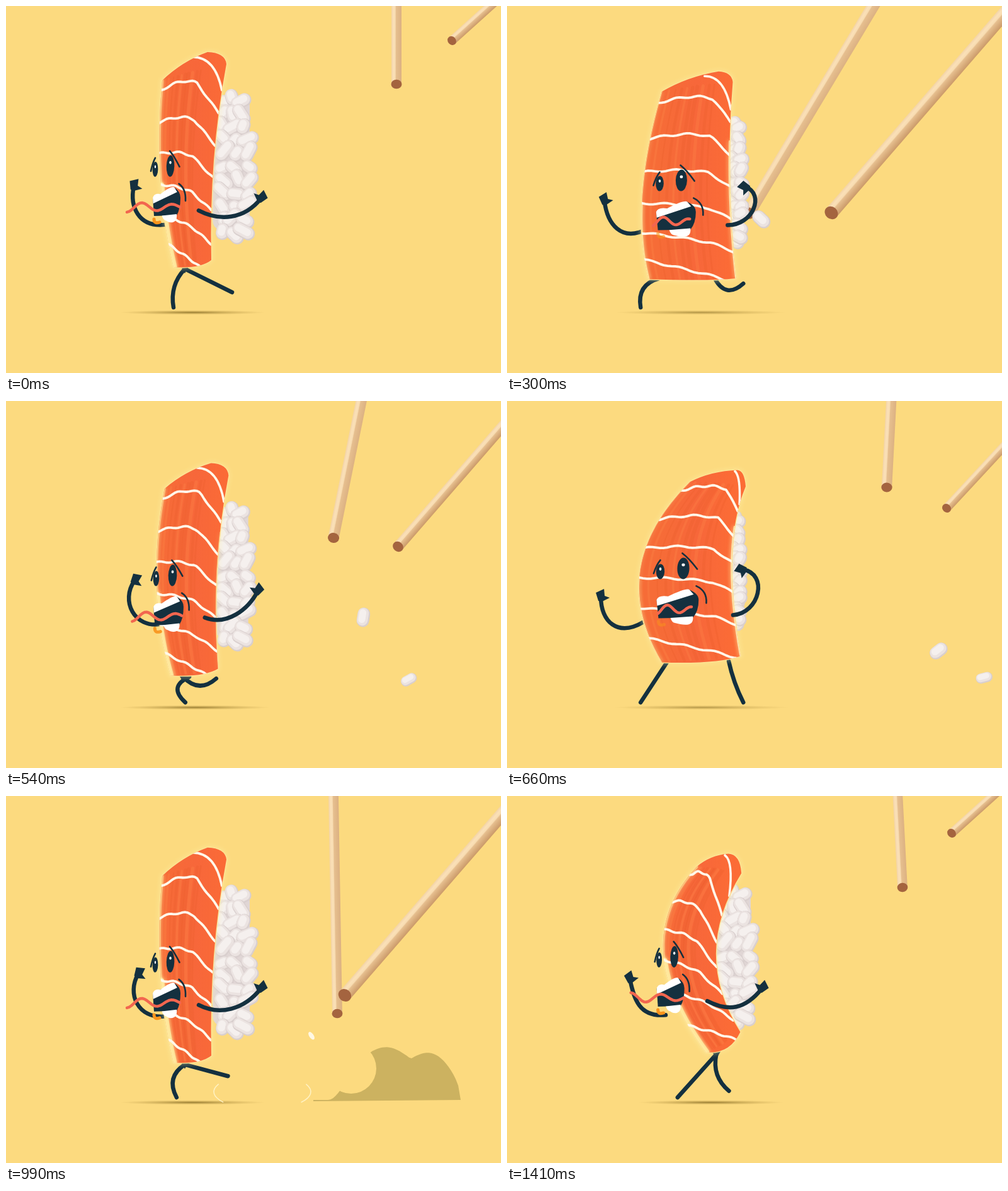
Write an HTML page with a canvas that moves like this. It is 786 px wide and 582 px high and loops after 1440 ms.

```html
<!DOCTYPE html>
<html lang="en">
<head>
<meta charset="utf-8">
<title>Sushi run</title>
<style>
html, body { margin: 0; width: 100%; height: 100%; overflow: hidden; background: #fcda7f; }
canvas { display: block; }
</style>
</head>
<body>
<canvas id="stage" width="786" height="582"></canvas>
<script>
const g = document.getElementById('stage').getContext('2d');
const LOOP = 1440, FRAME = 30, RUN = 480, STRIDE = RUN / 2;
const GROUND = 484, INK = '#14303f', CREAM = '#fff8ea', TAU = Math.PI * 2;

const mix = (a, b, k) => a + (b - a) * k;
const blend = (p, q, k) => p.map((v, i) => mix(v, q[i], k));
const clamp = (v, lo = 0, hi = 1) => Math.max(lo, Math.min(hi, v));
const ease = k => { k = clamp(k); return k * k * (3 - 2 * k); };
const wave = (t, peak, period) => Math.cos(TAU * (t - peak) / period);
const noise = k => { const v = Math.sin(k * 127.1 + 3.7) * 43758.5453; return v - Math.floor(v); };
const add = (p, x, y) => [p[0] + x, p[1] + y];

// ---- drawing helpers ----
function fill(color, draw) {
  g.beginPath(); draw(); g.fillStyle = color; g.fill();
}
function line(color, width, draw) {
  g.beginPath(); draw(); g.strokeStyle = color; g.lineWidth = width; g.stroke();
}
function poly(points) {
  points.forEach(p => g.lineTo(...p));
}
// Samples f(0..1) into a polyline.
function plot(f, n = 24) {
  for (let i = 0; i <= n; i++) g.lineTo(...f(i / n));
}
function local(x, y, turn, draw) {
  g.save(); g.translate(x, y); g.rotate(turn); draw(); g.restore();
}
function ramp(x0, x1, ...stops) {
  const s = g.createLinearGradient(x0, 0, x1, 0);
  stops.forEach(([at, color]) => s.addColorStop(at, color));
  return s;
}
const quad = (a, b, c, k) => blend(blend(a, b, k), blend(b, c, k), k);

// ---- what drives the run ----
// turn: 0 side view, 1 front view. bend: 0 upright, 1 arched. lift: bounce.
function mood(t) {
  const p = (t % STRIDE) / STRIDE;
  return {
    t,
    turn: clamp(.5 + .6 * wave(t, 225, RUN)),
    bend: ease((p - .15) / .55) * (1 - ease((p - .85) / .15)),
    lift: -18 * wave(t, 228, STRIDE),
    flick: Math.max(0, 1 - Math.abs(t % RUN - 450) / 30)
  };
}

// Outline keys: left top, bow, bottom; right top, bow, bottom; peak.
const SHAPES = [
  [[248,135], [233,291], [266,431], [350,109], [322,257], [326,420], [320,90]],
  [[305,128], [184,247], [320,422], [374,141], [290,268], [374,388], [354,109]],
  [[240,129], [190,318], [213,428], [358,113], [352,278], [370,430], [336,98]],
  [[290,134], [155,269], [245,420], [379,141], [339,236], [371,410], [366,115]]
];
function slab({ turn, bend, lift }) {
  return SHAPES[0].map((_, i) => {
    const [side, arched, front, frontArched] = SHAPES.map(s => s[i]);
    return add(blend(blend(side, arched, bend), blend(front, frontArched, bend), turn), 0, lift);
  });
}

// ---- character ----
function shadow({ turn, bend }) {
  const dark = mix(.7, .5, turn);
  g.save();
  g.translate(mix(296 + 30 * bend, 309, turn), 486);
  g.scale(mix(116, 140, turn), 3.6);
  const s = g.createRadialGradient(0, 0, 0, 0, 0, 1);
  s.addColorStop(0, `rgba(105,80,15,${dark})`);
  s.addColorStop(.4, `rgba(125,97,25,${dark * .55})`);
  s.addColorStop(1, 'rgba(160,125,45,0)');
  fill(s, () => g.arc(0, 0, 1, 0, TAU));
  g.restore();
}

function grain(x, y, turn, len, w) {
  const dx = Math.cos(turn) * len / 2, dy = Math.sin(turn) * len / 2;
  [['#d9cfce', 1], ['#ebe3e1', .87], ['#f5f0ee', .55]].forEach(([color, k], o) =>
    line(color, w * k, () => {
      g.moveTo(x - dx - o * .8, y - dy - o);
      g.lineTo(x + dx - o * .8, y + dy - o);
    }));
}

function rice({ turn, bend, lift }) {
  const x = mix(334, 350, turn), w = mix(61, 31, turn);
  const y = 154 + lift + 6 * bend + 23 * turn, h = 235 - 14 * bend - 38 * turn;
  fill('#e0d6d5', () => g.roundRect(x - 6, y + 6, w - 2, h - 22, 16));
  for (let i = 0; i < 33; i++) {
    const v = Math.floor(i / 3) / 10, u = clamp((i % 3) / 2 + (noise(i) - .5) * .2);
    const reach = (w - 22) * (.75 + .35 * Math.sin(Math.PI * v * .9));
    grain(x + 10 + reach * u, y + 12 + (h - 24) * v + (noise(i + 90) - .5) * 8,
      noise(i + 50) * 3, mix(6 + 12 * noise(i + 20), 5, turn), 21);
  }
}

function arm(shoulder, c1, c2, hand, side) {
  line(INK, 6.5, () => { g.moveTo(...shoulder); g.bezierCurveTo(...c1, ...c2, ...hand); });
  local(...hand, Math.atan2(hand[1] - c2[1], hand[0] - c2[0]) + Math.PI / 2, () => {
    g.scale(side, 1);
    fill(INK, () => poly([[-4, 6], [-8, -7], [5, -13], [6, -2], [14, 1], [2, 7]]));
  });
}
function farArm({ t, turn, lift }) {
  const swing = wave(t, 105, RUN) * (1 - turn);
  const shoulder = [mix(252, 217, turn), 352 + lift * .3];
  const hand = [mix(199, 149, turn) + 20 * swing, mix(288, 311, turn) - 11 * swing];
  arm(shoulder, add(shoulder, -42, mix(4, 25, turn)), add(hand, -34 * swing, mix(32, 38, turn)), hand, 1);
}
function nearArm({ turn, bend, lift }) {
  const shoulder = [mix(306 + 13 * bend, 359, turn), 338 + lift * .8 + turn * 6];
  const hand = [mix(405, 374, turn), mix(305, 285 - 18 * bend, turn)];
  arm(shoulder, add(shoulder, mix(33, 42, turn), mix(17, -3, turn)),
    add(hand, mix(-27, 42, turn), mix(34, 7, turn)), hand, -1);
}

// Each foot slides back on the ground, then lifts and swings forward.
function leg(t, hip, center, reach) {
  t %= RUN;
  const air = Math.sin(Math.PI * clamp((t - 190) / 230));
  const foot = [center - reach * wave(t, 0, RUN), 478 - 38 * air];
  const dx = foot[0] - hip[0], dy = foot[1] - hip[1], d = Math.hypot(dx, dy);
  const slack = .55 * Math.sqrt(Math.max(0, 70 * 70 - d * d)) / d;
  const knee = add(blend(hip, foot, .5), -dy * slack, dx * slack);
  line(INK, 6.5, () => { g.moveTo(...hip); g.quadraticCurveTo(...knee, ...foot); });
}
function legs({ t, turn }, shape) {
  const [, , left, , , right] = shape;
  const hip = k => [mix(left[0], right[0], mix(.3, k, turn)), left[1] + mix(3, -2, turn)];
  leg(t + STRIDE, hip(.08), 273, 86);
  leg(t, hip(.85), 330, 64);
  if (turn < .2) {
    const [x, y] = hip(0);
    fill(INK, () => poly([[x - 7, y - 5], [x + 7, y - 5], [x, y + 7]]));
  }
}

function fillet({ turn, bend }, shape) {
  const [tl, lc, bl, tr, rc, br, top] = shape;
  const L = v => quad(tl, lc, bl, v), R = v => quad(tr, rc, br, v);
  const outline = () => {
    g.moveTo(...bl);
    g.quadraticCurveTo(...lc, ...tl);
    g.quadraticCurveTo(...add(blend(tl, top, .5), -4, -8), ...top);
    g.quadraticCurveTo(tr[0] - 2, top[1] + 1, ...tr);
    g.quadraticCurveTo(...rc, ...br);
    g.quadraticCurveTo(mix(bl[0], br[0], .7), Math.max(bl[1], br[1]) + 3, ...bl);
    g.closePath();
  };
  g.save();
  g.shadowColor = '#fff0a8';
  g.shadowBlur = 7;
  line('#fde596', 2.5, outline);
  g.restore();

  g.save();
  fill(ramp(240, 365, [0, '#f66c37'], [.5, '#f7673a'], [1, '#fc6c35']), outline);
  g.clip();
  const peak = mix(.62, .79, turn);
  for (let i = 0; i < 9; i++) {
    const u = .1 + (peak - .12) * i / 8 + noise(i) * .03;
    line(i % 3 ? 'rgba(214,76,30,.13)' : 'rgba(255,150,80,.2)', 2 + 4 * noise(i + 7),
      () => plot(v => blend(L(v), R(v), u)));
  }
  g.shadowColor = '#fff0a0';
  g.shadowBlur = 6;
  line('rgba(255,225,145,.6)', mix(5, 1.5, turn), () => plot(L));
  line('rgba(255,236,160,.85)', mix(11, 2, turn), () => plot(k => L(mix(.55, 1, k))));
  line('#fdeab4', 3 * turn + .01, () => plot(k => R(mix(.3, 1, k))));
  g.shadowBlur = 0;

  line(CREAM, 3.6, () => {
    g.moveTo(...add(top, mix(-24, -4, bend), mix(8, 2, bend)));
    g.quadraticCurveTo(...blend(top, tr, .4), ...R(.14));
  });
  for (let i = 0; i < 6; i++) {
    const v = .05 + .165 * i, a = L(v), b = R(v + mix(.21, .14, turn));
    const bow = mix(34, 28, turn) * (1 - i / 6) ** 1.4;
    line(CREAM, 3.8, () => plot(u => {
      const rise = u < peak ? Math.sin(u / peak * Math.PI / 2) : (1 - u) / (1 - peak);
      return add(blend(a, b, u), 0, Math.sin(u * 19 + i * 2) * 1.5 - bow * rise);
    }));
  }
  g.restore();
}

function drawFace({ turn, bend, lift, flick }) {
  const wide = mix(1, 1.52, turn);
  const x0 = mix(261 + 5 * bend, 280, turn), y0 = 271 + lift;
  const at = (x, y) => [x0 + x * wide, y0 + y];
  const eye = (x, y, rx, ry) => {
    const [cx, cy] = at(x, y);
    fill(INK, () => g.ellipse(cx, cy, rx * wide, ry, .03, 0, TAU));
    fill('#fff', () => g.ellipse(cx, cy - ry * .33, rx * wide * .27, 2.4, 0, 0, TAU));
  };
  const stroke = (a, b, c) =>
    line(INK, 2.6, () => { g.moveTo(...a); g.quadraticCurveTo(...b, ...c); });
  eye(-24, 5, 4.4, 12);
  eye(0, 0, 6.3, 17);
  stroke(at(-24, -13), at(-28, -6), at(-31, 8));
  stroke(at(-1, -24), at(6, -16), at(14.5, 1));
  stroke(at(13.5, 28), at(25, 36), at(24, 55));

  const a = at(-28, 50), b = at(6.5, 34), c = at(16, 50), d = at(10, 78), e = at(-26, 79);
  line(`rgba(248,148,28,${mix(1, .5, turn)})`, 5, () => {
    g.moveTo(...add(e, 0, 5));
    g.quadraticCurveTo(...add(e, 0, 13), ...add(e, 9, 10));
  });
  fill(INK, () => {
    g.moveTo(...a); g.lineTo(...b);
    g.quadraticCurveTo(...add(c, 0, -10), ...c);
    g.quadraticCurveTo(...add(c, 0, 18), ...d);
    g.lineTo(...e);
  });
  fill('#fff', () => {
    g.moveTo(...a);
    g.quadraticCurveTo(...add(a, 3, -8), ...blend(a, b, .35));
    g.quadraticCurveTo(...add(b, -4, -4), ...b);
    g.lineTo(...blend(b, c, .45));
    g.lineTo(...blend(a, e, .32));
  });
  const gum = blend(e, d, .35);
  fill('#fff', () => {
    g.moveTo(...gum); g.lineTo(...add(d, 0, -2));
    g.bezierCurveTo(...add(d, 2, 14), ...add(d, -12, 13), ...add(gum, 7, 8));
    g.quadraticCurveTo(...add(gum, 2, 7), ...gum);
  });

  const phase = turn * Math.PI / 2 + flick * Math.PI, turns = mix(1.75, 1.4, turn);
  line('#f2664f', 4.5, () => plot(u => [
    x0 + mix(mix(15, 13, turn), mix(-69, -40, turn), u),
    y0 + 65 - (4 + 4 * u) * Math.sin(TAU * turns * u + phase)
  ]));
}

// ---- chopsticks ----
const HITS = [840, 1140], DOWN = [416, 473, 13, 430, 449];
// Time, then tip and lean of the left stick, tip of the right one.
const PATH = [
  [0, 620, 124, 0, 708, 55], [180, 331, 360, 42, 483, 364], [420, 437, 297, 20, 547, 292],
  [660, 603, 137, 3, 698, 170], [HITS[0], ...DOWN], [900, ...DOWN], [990, 526, 345, -1, 538, 316],
  [HITS[1], ...DOWN], [1230, ...DOWN], [1410, 628, 145, -3, 706, 59], [LOOP, 620, 124, 0, 708, 55]
];
function stick(x, y, lean, w, len, dark) {
  local(x, y, lean * Math.PI / 180, () => {
    fill(ramp(-w / 2, w / 2, [0, '#f3d3a5'], [.2, '#fae0b8'], [.38, '#f8dcb1'], [.46, '#e6bf8f'], [1, dark]),
      () => poly([[-w / 2, 0], [-w / 2, 4 - len], [0, -len], [w / 2, 10 - len], [w / 2, 0]]));
    fill('#a4643f', () => g.ellipse(0, 0, w / 2 + .5, w * .46, 0, 0, TAU));
  });
}
function chopsticks(t) {
  const i = PATH.findIndex(k => k[0] > t), from = PATH[i - 1], to = PATH[i];
  const k = ease((t - from[0]) / (to[0] - from[0]));
  const [, ax, ay, lean, bx, by] = blend(from, to, k);
  stick(ax, ay, lean, 16 + lean * .1, 477, '#dcb182');
  stick(bx, by, mix(48, 41, clamp(by / 150 - .4)), clamp(14 + (by - 170) * .045, 14, 23), 800, '#cb9a69');
}

// ---- dust, ring and loose grains ----
function puff(age) {
  const grow = 1 - (1 - clamp(age / 90)) ** 2, late = clamp((age - 90) / 60);
  const x = mix(440, 488, late), width = mix(245, 234, late) * grow;
  const height = mix(50, 84, late) * grow, rise = mix(.45, .3, late);
  const eaten = Math.max(0, age - 90);
  g.save();
  g.beginPath();
  g.rect(0, 0, 786, 582);
  g.arc(548 + Math.max(0, age - 150) * .7, 432, eaten < 60 ? eaten * .67 : 40 + (eaten - 60) * 1.3, 0, TAU);
  g.clip('evenodd');
  fill('#ccb260', () => {
    plot(u => {
      const dome = ease((u - .1) / rise) * Math.sqrt(1 - u ** 7);
      return [x + u * width, GROUND - 2 - height * dome * (.8 + .2 * Math.abs(Math.sin(u * 9.5)))];
    }, 60);
    g.lineTo(x, GROUND);
  });
  g.restore();
}
function impact(age) {
  if (age < 0 || age > 260) return;
  puff(age);
  const grow = 1 - (1 - clamp(age / 90)) ** 2, fade = 1 - clamp((age - 60) / 110);
  if (fade > 0)
    for (const mid of [Math.PI * .97, .1])
      line('#fff2c4', 1 + 3 * fade, () =>
        g.ellipse(407, 469, 77 * grow, 28 * grow, 0, mid - .35 - fade, mid + .35 + fade));
  if (age > 40 && age < 190)
    local(491 - (age - 90) * .1, 424 - (age - 90) * .73, .6 - (age - 90) * .02, () =>
      fill('#fff8e4', () => g.ellipse(0, 0, 3.5, 7, 0, 0, TAU)));
}

// Thrown rice falls, bounces once and flies out to the right.
function thrown(age, x, y, vy, w) {
  const pull = .0073, floor = 478, px = x + age * .983;
  if (age < 0 || px > 810) return;
  const land = (-vy + Math.sqrt(vy * vy + 2 * pull * (floor - y))) / pull, after = age - land;
  const py = after < 0 ? y + vy * age + pull * age * age / 2
    : floor - .86 * after + pull * after * after / 2;
  grain(px, py, 3.1 - 2.5 * Math.exp(-age / 150), 11, after < 0 ? w : w * .75);
}

function draw(t) {
  const m = mood(t), shape = slab(m);
  g.fillStyle = '#fcda7f';
  g.fillRect(0, 0, 786, 582);
  g.lineCap = g.lineJoin = 'round';
  shadow(m);
  HITS.forEach(hit => impact(t - hit));
  chopsticks(t);
  thrown(t - 290, 394, 338, 0, 21);
  thrown(t - 450, 479, 372, -.65, 20);
  rice(m);
  farArm(m);
  legs(m, shape);
  fillet(m, shape);
  drawFace(m);
  nearArm(m);
}

const start = performance.now();
function tick() {
  draw(Math.floor(((performance.now() - start) % LOOP) / FRAME) * FRAME);
  requestAnimationFrame(tick);
}
tick();
</script>
</body>
</html>
```
